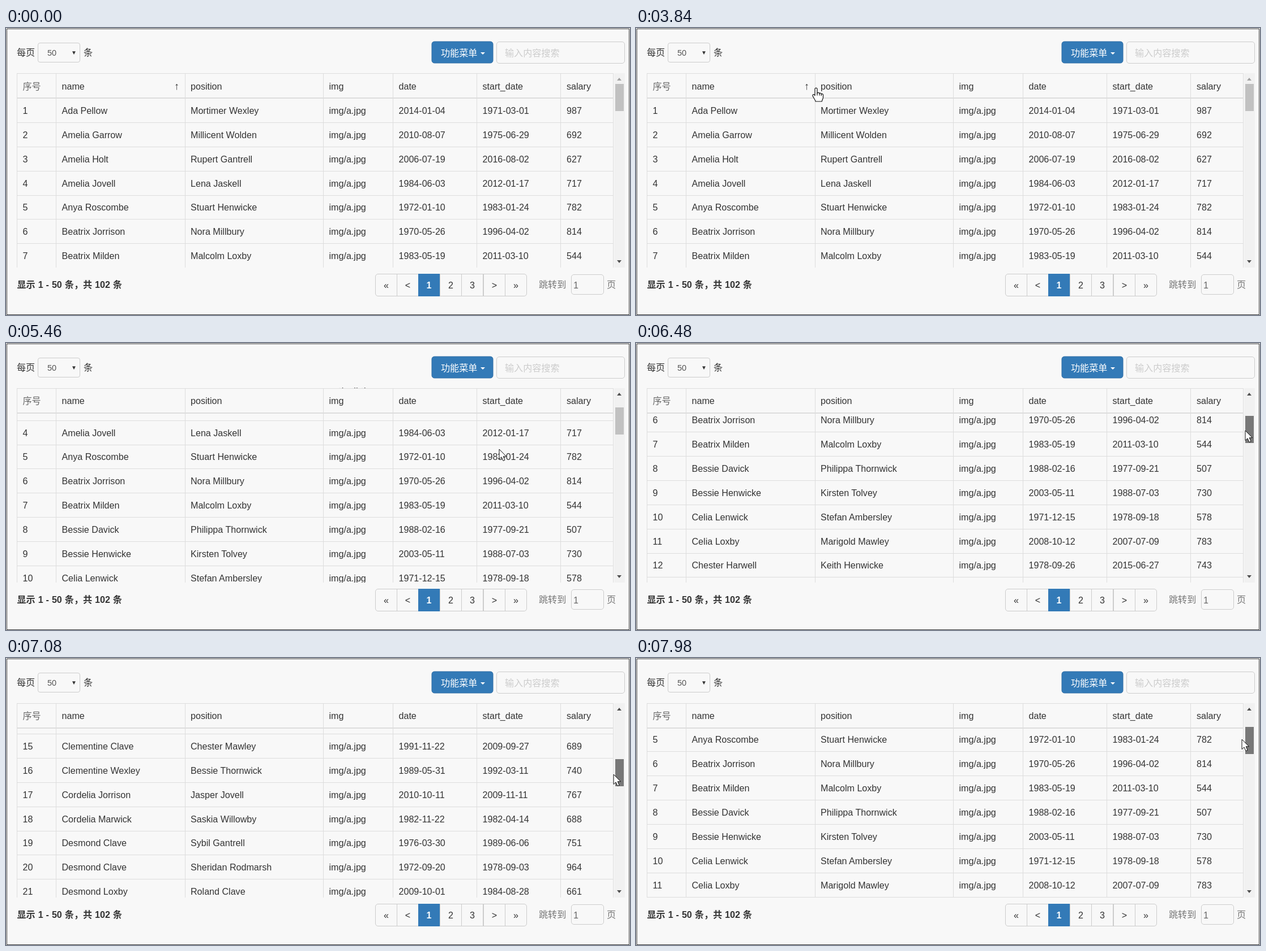
Recreate the animation shown at these times as an HTML page. Size 1102 by 508 pixels, loop 8 s.

```html
<!DOCTYPE html>
<html lang="zh">
<head>
<meta charset="utf-8">
<title>Table</title>
<style>
  html, body { margin: 0; width: 100%; height: 100%; overflow: hidden; background: #f8f8f8; }
  * { box-sizing: border-box; }
  body { font: 16.1px/20px "Liberation Sans", "Noto Sans CJK SC", "Noto Sans CJK", sans-serif; color: #333; }
  #stage { position: relative; width: 1102px; height: 508px; overflow: hidden; background: #f8f8f8; }
  #stage div, #stage svg { position: absolute; }
  .frame { left: 1px; top: 1px; width: 1100px; height: 507px; border: 1px solid #3a3a3a; }
  .text { white-space: pre; }
  .box { border: 1px solid #ccc; border-radius: 5px; }
  .blue { background: #337ab7; border-color: #2e6da4; color: #fff; }
  .box.blue { transform: translate(-.5px, -.5px); }
  .page { top: 435px; width: 39px; height: 40px; border: 1px solid #ccc; line-height: 39px; text-align: center; }
  .page:nth-child(1) { border-radius: 5px 0 0 5px; }
  .page:nth-child(7) { border-radius: 0 5px 5px 0; }
  .page.blue { width: 38px; font-weight: bold; border-color: #337ab7; z-index: 1; }
  #clip { left: 19px; top: 79px; width: 1054px; height: 345px; overflow: hidden; }
  .rows { left: -19px; top: 46px; width: 1092px; height: 0; }
  .row { left: 0; width: 1092px; height: 43px; border-bottom: 1px solid #ddd; }
  .row .text { line-height: 43px; }
  #head { left: 19px; top: 80px; width: 1054px; height: 45px; background: #f8f8f8; border: solid #ddd; border-width: 1px 0 2px; }
  .line { top: 80px; width: 1px; height: 344px; background: #ddd; }
  #track { left: 1074px; top: 80px; width: 19px; height: 344px; background: #f1f1f1; }
  #thumb { left: 1076px; width: 15px; height: 48px; }
  .tri { width: 0; height: 0; border: solid transparent; }
</style>
</head>
<body>
<div id="stage">
  <div class="frame"></div>
  <div id="clip"><div class="rows" id="asc"></div><div class="rows" id="desc"></div></div>
  <div id="head"></div>
  <div id="labels"></div>
  <div id="lines"></div>
  <div id="track"></div>
  <div id="thumb"></div>
  <div id="up" class="tri" style="left:1079px;top:88px;border-width:0 4px 5px"></div>
  <div class="tri" style="left:1079px;top:411px;border-width:5px 4px 0;border-top-color:#505050"></div>
  <div class="box" style="left:56px;top:26px;width:75px;height:35px;border-radius:4px"></div>
  <div class="box blue" style="left:752px;top:24px;width:109px;height:39px"></div>
  <div class="tri" style="left:838px;top:43px;border-width:4.6px 4.6px 0;border-top-color:#fff"></div>
  <div class="box" style="left:866px;top:24px;width:227px;height:39px"></div>
  <div class="box" style="left:998px;top:436px;width:58px;height:36px"></div>
  <div id="ui"></div>
  <div id="pages"></div>
  <svg id="cursor" width="40" height="40" viewBox="-10 -5 40 40" fill="#fff" stroke="#111" stroke-linejoin="round">
    <path id="arrow" d="M0 0V17.5L4 13.8L7 20.5L10 19.2L7.2 12.7H12.5Z"/>
    <g id="hand" stroke-width="1.2">
      <path d="M-2 1.2A2 2 0 0 1 2 1.2V8.5C2.4 7 5.6 7 6 9C6.6 7.6 9 8 9.3 10C10 9 12.5 9.4 12.5 11.5V16C12.5 18.5 10.5 20 10.3 23H-1C-1 20.5-4.5 17-6 13C-6.6 10.6-3.8 9.6-2 12.5Z"/>
      <path d="M2 8V12.5M6 9V12.5M9.3 10V13" fill="none"/>
    </g>
  </svg>
</div>
<script>
const $ = id => document.getElementById(id);
const cols = [29.5, 98.5, 326, 570.5, 693.5, 841.5, 990];
const LOOP = 8000, STEP = 60, PITCH = 42.86;

const ascending = `Ada Pellow|Mortimer Wexley|2014-01-04|1971-03-01|987
Amelia Garrow|Millicent Wolden|2010-08-07|1975-06-29|692
Amelia Holt|Rupert Gantrell|2006-07-19|2016-08-02|627
Amelia Jovell|Lena Jaskell|1984-06-03|2012-01-17|717
Anya Roscombe|Stuart Henwicke|1972-01-10|1983-01-24|782
Beatrix Jorrison|Nora Millbury|1970-05-26|1996-04-02|814
Beatrix Milden|Malcolm Loxby|1983-05-19|2011-03-10|544
Bessie Davick|Philippa Thornwick|1988-02-16|1977-09-21|507
Bessie Henwicke|Kirsten Tolvey|2003-05-11|1988-07-03|730
Celia Lenwick|Stefan Ambersley|1971-12-15|1978-09-18|578
Celia Loxby|Marigold Mawley|2008-10-12|2007-07-09|783
Chester Harwell|Keith Henwicke|1978-09-26|2015-06-27|743
Chester Mawley|Edith Roscombe
Chester Tolvey|Gordon Pellow
Clementine Clave|Chester Mawley|1991-11-22|2009-09-27|689
Clementine Wexley|Bessie Thornwick|1989-05-31|1992-03-11|740
Cordelia Jorrison|Jasper Jovell|2010-10-11|2009-11-11|767
Cordelia Marwick|Saskia Willowby|1982-11-22|1982-04-14|688
Desmond Clave|Sybil Gantrell|1976-03-30|1989-06-06|751
Desmond Clave|Sheridan Rodmarsh|1972-09-20|1978-09-03|964
Desmond Loxby|Roland Clave|2009-10-01|1984-08-28|661
Desmond Marwick|Nora Harwell
Dorothea Garrow|Rupert Milden
Dorothea Tolvey|Lena Wolden`;

const descending = `Winifred Wolden|Jasper Garrow
Winifred Loxby|Nora Thornwick
Wilfred Tolvey|Stuart Mawley
Wilfred Clave|Marigold Jovell
Tabitha Roscombe|Keith Lenwick
Tabitha Harwell|Sybil Ambersley
Sybil Henwicke|Roland Millbury`;

let seed = 17;
const rand = (lo, hi) => {
  seed = (seed * 16807) % 2147483647;
  return lo + Math.floor(seed / 2147483647 * (hi - lo + 1));
};
const two = n => String(n).padStart(2, '0');
const randDate = () => `${rand(1970, 2016)}-${two(rand(1, 12))}-${two(rand(1, 28))}`;

function add(parent, cls, style, text = '') {
  const el = document.createElement('div');
  el.className = cls;
  el.style.cssText = style;
  el.textContent = text;
  parent.append(el);
  return el;
}
const label = (parent, x, y, text, style = '') =>
  add(parent, 'text', `left:${x}px;top:${y - 10}px;${style}`, text);

function fillRows(parent, data) {
  data.split('\n').forEach((line, i) => {
    const [name, position, date = randDate(), start = randDate(), salary = rand(500, 999)] = line.split('|');
    const row = add(parent, 'row', `top:${Math.round(i * PITCH)}px`);
    [i + 1, name, position, 'img/a.jpg', date, start, salary]
      .forEach((v, c) => add(row, 'text', `left:${cols[c]}px;top:0`, v));
  });
}
fillRows($('asc'), ascending);
fillRows($('desc'), descending);

['序号', 'name', 'position', 'img', 'date', 'start_date', 'salary']
  .forEach((t, i) => label($('labels'), cols[i], 103, t, i ? '' : 'color:#666;font-weight:300'));
const sortMark = label($('labels'), 297, 103, '↑', 'font-size:18px');
[19, 88, 316, 560, 683, 831, 979, 1072].forEach(x => add($('lines'), 'line', `left:${x}px`));

const ui = $('ui');
label(ui, 19, 43, '每页');
label(ui, 73, 44, '50', 'font-size:14.5px;color:#555');
label(ui, 115, 44, '▼', 'font-size:10px');
label(ui, 137, 43, '条');
label(ui, 768, 44, '功能菜单', 'color:#fff');
label(ui, 881, 44, '输入内容搜索', 'color:#ccc;font-weight:300');
label(ui, 19.5, 454, '显示 1 - 50 条，共 102 条', 'font-weight:bold;word-spacing:.5px');
label(ui, 941, 454, '跳转到', 'color:#777;font-weight:300');
label(ui, 1002, 455, '1', 'color:#666');
label(ui, 1061, 454, '页', 'color:#777;font-weight:300');
['«', '<', '1', '2', '3', '>', '»'].forEach((t, i) =>
  add($('pages'), t === '1' ? 'page blue' : 'page', `left:${Math.round(652 + i * 38.1)}px`, t));

// Keys: time, then values, linear in between.
const path = [
  [420, 953, 51], [540, 800, 72], [660, 490, 102], [720, 400, 108], [840, 400, 108],
  [1380, 106, 121], [1560, 106, 121], [1860, 207, 103], [2820, 207, 103], [3060, 216, 103],
  [3540, 216, 103], [3840, 318, 107], [4380, 543, 116], [5220, 862, 190], [5460, 871, 188],
  [6060, 1080, 140], [6120, 1080, 140], [6480, 1076, 155], [6960, 1073, 198], [7080, 1073, 206],
  [7320, 1073, 213], [7440, 1073, 213], [7980, 1070, 144]
];
const scrolls = [
  [5160, 0], [5220, 4], [5280, 40], [5400, 106], [5460, 116], [6120, 116], [6480, 224],
  [6960, 530], [7080, 590], [7320, 640], [7440, 640], [7980, 173]
];

function at(keys, t) {
  const n = keys.findIndex(k => k[0] > t);
  if (n === 0) return keys[0].slice(1);
  if (n < 0) return keys[keys.length - 1].slice(1);
  const a = keys[n - 1], b = keys[n], p = (t - a[0]) / (b[0] - a[0]);
  return a.slice(1).map((v, i) => v + (b[i + 1] - v) * p);
}

function draw(now) {
  const t = Math.floor(now % LOOP / STEP) * STEP;
  const [x, y] = at(path, t).map(Math.round);
  const scroll = Math.round(at(scrolls, t)[0]);
  const reversed = t >= 2520 && t < 3360;
  const onHead = y >= 80 && y < 124 && x < 1073;

  $('asc').style.display = reversed ? 'none' : '';
  $('desc').style.display = reversed ? '' : 'none';
  $('asc').style.transform = `translateY(${-scroll}px)`;
  $('labels').style.top = scroll ? '-1px' : '0';
  sortMark.textContent = reversed ? '↓' : '↑';
  sortMark.style.display = scroll ? 'none' : '';

  $('thumb').style.top = Math.round(98.6 + scroll / 7.3) + 'px';
  $('thumb').style.background = t >= 6120 ? '#787878' : t >= 6060 ? '#a8a8a8' : '#c1c1c1';
  $('up').style.borderBottomColor = scroll ? '#505050' : '#a3a3a3';

  $('cursor').style.display = t < 420 ? 'none' : '';
  $('cursor').style.transform = `translate(${x - 10}px, ${y - 5}px)`;
  $('hand').style.display = onHead ? '' : 'none';
  $('arrow').style.display = onHead ? 'none' : '';
}

let begin;
function tick(now) {
  begin ??= now;
  draw(now - begin);
  requestAnimationFrame(tick);
}
draw(0);
requestAnimationFrame(tick);
</script>
</body>
</html>
```
